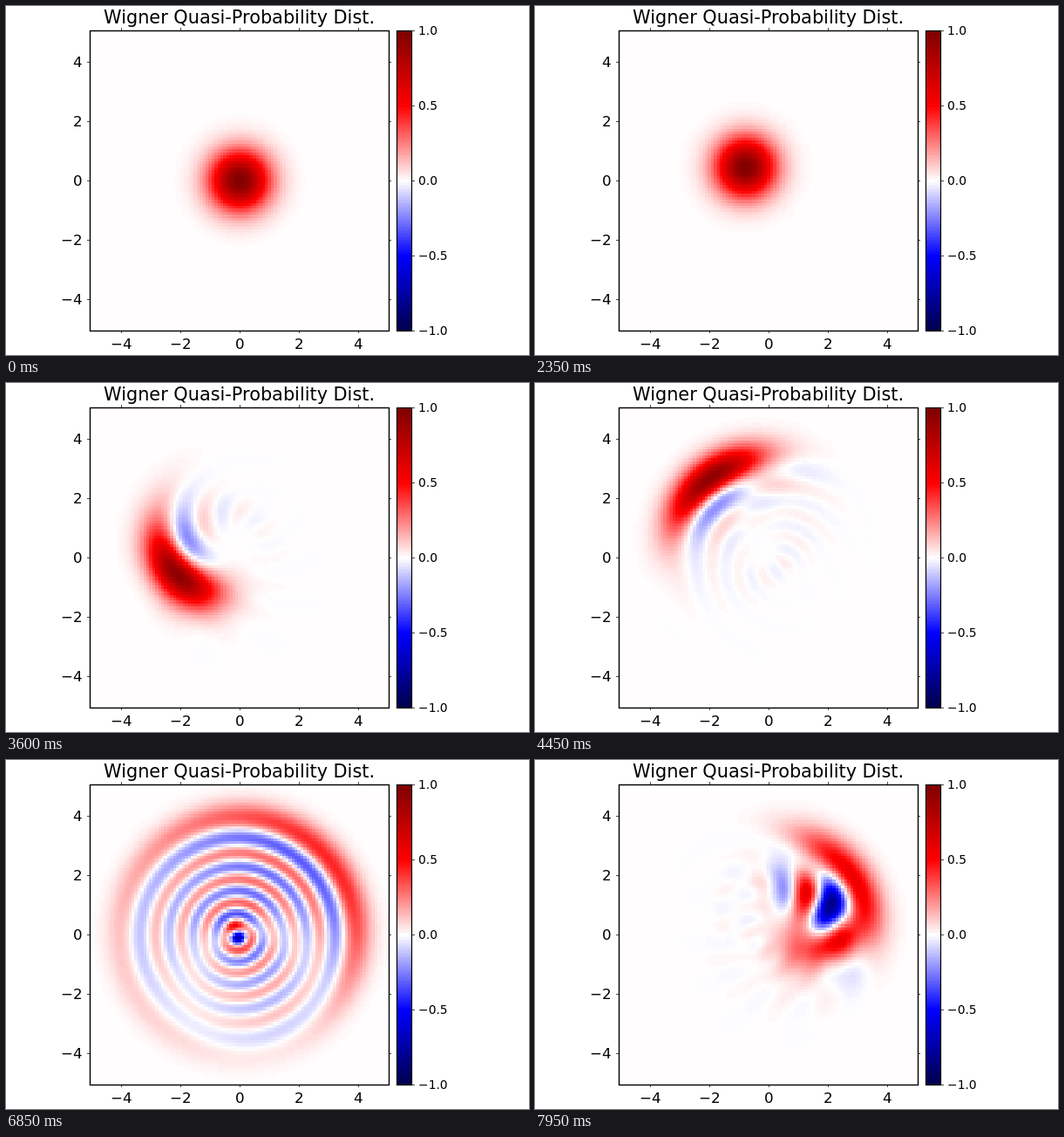
An HTML page with a canvas that plays this animation: 600x400 px, repeating every 8 s.

```html
<!DOCTYPE html>
<html lang="en">
<head>
<meta charset="utf-8">
<title>Wigner Quasi-Probability Dist.</title>
<style>
html, body { margin: 0; width: 100%; height: 100%; overflow: hidden; background: #fff; }
canvas { display: block; width: 600px; height: 400px; }
</style>
</head>
<body>
<canvas id="plot" width="600" height="400"></canvas>
<script>
const LOOP = 8000, STEP = 50;
const N = 101, UNIT = 34, CX = 268, CY = 200;
const LEVELS = 10; // number states kept
const RAD = Math.PI / 180;
const ctx = document.getElementById('plot').getContext('2d');
const grid = document.createElement('canvas');
grid.width = grid.height = N;
const gctx = grid.getContext('2d');
const img = gctx.createImageData(N, N);

// Diverging colour map: dark blue, blue, white, red, dark red
const STOPS = [[0, 0, 76.5], [0, 0, 255], [255, 255, 255], [255, 0, 0], [127.5, 0, 0]];
const PALETTE = Array.from({ length: 256 }, (_, i) => {
  const f = i / 255 * 4, k = Math.min(3, Math.floor(f));
  return STOPS[k].map((a, c) => Math.round(a + (STOPS[k + 1][c] - a) * (f - k)));
});
const color = v => PALETTE[Math.max(0, Math.min(255, Math.floor((v + 1.0005) * 128)))];

// Wigner functions of |n+d><n| on the grid, split into real and imaginary parts
function makeBasis() {
  const basis = [];
  for (let d = 0; d < LEVELS; d++) {
    const row = Array.from({ length: LEVELS - d }, (_, n) =>
      ({ m: n + d, n, re: new Float32Array(N * N), im: new Float32Array(N * N) }));
    for (let i = 0; i < N * N; i++) {
      const x = (i % N - 50) / 10, y = (50 - Math.floor(i / N)) / 10;
      const s = 2 * (x * x + y * y);
      const angle = -d * Math.atan2(y, x);
      let scale = Math.exp(-s / 2) * Math.pow(s, d / 2);
      for (let k = 1; k <= d; k++) scale /= Math.sqrt(k);
      let prev = 0, lag = 1;
      for (const { n, re, im } of row) {
        re[i] = scale * lag * Math.cos(angle);
        im[i] = scale * lag * Math.sin(angle);
        [prev, lag] = [lag, ((2 * n + 1 + d - s) * lag - (n + d) * prev) / (n + 1)];
        scale *= -Math.sqrt((n + 1) / (n + 1 + d));
      }
    }
    basis.push(...row);
  }
  return basis;
}
const BASIS = makeBasis();

function normalize(state) {
  const norm = Math.sqrt(state.reduce((sum, [a, b]) => sum + a * a + b * b, 0));
  return state.map(([a, b]) => [a / norm, b / norm]);
}

// State vector from an amplitude and a phase for each level
const makeState = (amp, phase) => normalize(Array.from({ length: LEVELS }, (_, n) =>
  [amp(n) * Math.cos(phase(n)), amp(n) * Math.sin(phase(n))]));

// Round packet centred on (x, y), sheared by the Kerr phase
function coherent(x, y, kerr, offset) {
  const r = Math.hypot(x, y) / Math.SQRT2, angle = Math.atan2(y, x);
  const amps = [1];
  for (let n = 1; n < LEVELS; n++) amps.push(amps[n - 1] * r / Math.sqrt(n));
  return makeState(n => amps[n], n => offset + n * angle - kerr * (n - 2) ** 2);
}

// Packet spread along a circle, around level `mean`
function crescent(mean, deg, shear, skew) {
  return makeState(
    n => Math.exp(-0.16 * (n - mean) ** 2),
    n => n * deg * RAD + shear * (n - 9) ** 2 + skew * (n - 6) ** 3
  );
}

// Key points: time in seconds, then the packet's parameters
const ROUND = [ // x, y, kerr, phase
  [0.15, 0, 0, 0, -3.5], [1.4, 0.02, 0.25, 0, -3.5], [1.75, -0.07, 0.43, 0, -3.5],
  [2.1, -0.38, 0.5, 0, -3.5], [2.5, -1.02, 0.42, 0, -3.5], [2.85, -1.6, 0.15, 0, -3.5],
  [3.2, -1.9, -0.4, 0.05, -3.5], [3.6, -2, -1.1, 0.12, -3.5], [4.45, -2.3, -0.6, 0.12, -3.5],
  [6.85, 1.3, -0.4, 0, -1.3]
];
const BENT = [ // share, mean level, angle, shear, skew
  [3.6, 0, 5, 145, 0, 0], [4.45, 1, 5.9, 132, 0, -0.02], [5.3, 1, 5.9, 129, 0, -0.02],
  [6.1, 1, 6.8, 122, 0.06, -0.01], [6.85, 1, 10.4, 96, 0.52, 0], [7.95, 0.6, 6.2, 37, 0, 0]
];

function sample(track, t) {
  const next = track.findIndex(p => p[0] > t);
  if (next === 0) return track[0].slice(1);
  if (next < 0) return track[track.length - 1].slice(1);
  const a = track[next - 1], b = track[next];
  const k = (t - a[0]) / (b[0] - a[0]);
  return a.slice(1).map((v, i) => v + (b[i + 1] - v) * k);
}

function stateAt(t) {
  const [share, ...bent] = sample(BENT, t);
  const u = Math.cos(share * Math.PI / 2), v = Math.sin(share * Math.PI / 2);
  const a = coherent(...sample(ROUND, t)), b = crescent(...bent);
  return normalize(a.map(([re, im], n) => [u * re + v * b[n][0], u * im + v * b[n][1]]));
}

function drawField(t) {
  const state = stateAt(t);
  const field = new Float32Array(N * N);
  for (const { m, n, re, im } of BASIS) {
    const [a, b] = state[m], [c, d] = state[n];
    const w = m === n ? 1 : 2;
    const p = w * (a * c + b * d), q = w * (b * c - a * d);
    for (let i = 0; i < field.length; i++) field[i] += p * re[i] - q * im[i];
  }
  field.forEach((v, i) => {
    const [red, green, blue] = color(v);
    img.data.set([red, green, blue, 255], i * 4);
  });
  gctx.putImageData(img, 0, 0);
  ctx.imageSmoothingEnabled = false;
  const size = N * UNIT / 10;
  ctx.drawImage(grid, CX - size / 2, CY - size / 2, size, size);
}

// Text starts on a whole pixel; `anchor` is 0 left, 0.5 centre, 1 right
function label(text, x, y, size, anchor) {
  ctx.font = size + 'px "DejaVu Sans", sans-serif';
  ctx.fillText(text, Math.round(x - anchor * ctx.measureText(text).width), y);
}

function tick(x, y, dx, dy) {
  ctx.beginPath();
  ctx.moveTo(x, y);
  ctx.lineTo(x + dx, y + dy);
  ctx.stroke();
}

const signed = (v, digits) => (v < 0 ? '\u2212' : '') + Math.abs(v).toFixed(digits);

function drawAxes() {
  ctx.fillStyle = ctx.strokeStyle = '#000';
  label('Wigner Quasi-Probability Dist.', CX, 20, 20.83, 0.5);
  ctx.lineWidth = 0.7;
  for (let v = -4; v <= 4; v += 2) {
    const x = CX + v * UNIT, y = CY - v * UNIT;
    label(signed(v, 0), x, 393, 16.67, 0.5);
    label(signed(v, 0), 88, y + 6, 16.67, 1);
    tick(x + 0.5, 28, 0, -3);
    tick(x + 0.5, 372, 0, 3);
    tick(96, y + 0.5, -3, 0);
    tick(439, y + 0.5, 3, 0);
  }
  ctx.lineWidth = 1.4;
  ctx.strokeRect(96.5, 28.5, 343, 344);
}

function drawBar() {
  for (let y = 28; y < 372; y++) {
    ctx.fillStyle = 'rgb(' + color(1 - (y - 28) / 172) + ')';
    ctx.fillRect(448, y, 18, 1);
  }
  ctx.fillStyle = '#000';
  ctx.lineWidth = 0.7;
  for (let v = -1; v <= 1; v += 0.5) {
    const y = 200 - v * 172;
    tick(466, y + 0.5, 3, 0);
    label(signed(v, 1), 473, y + 5, 13.89, 0);
  }
  ctx.lineWidth = 1.2;
  ctx.strokeRect(448.5, 28.5, 17, 344);
}

let shown = -1;
function frame(now) {
  const step = Math.floor((now - start) % LOOP / STEP);
  if (step !== shown && step >= 0) {
    shown = step;
    ctx.fillStyle = '#fff';
    ctx.fillRect(0, 0, 600, 400);
    drawField(step * STEP / 1000);
    drawAxes();
    drawBar();
  }
  requestAnimationFrame(frame);
}

const start = performance.now();
frame(start);
</script>
</body>
</html>
```
